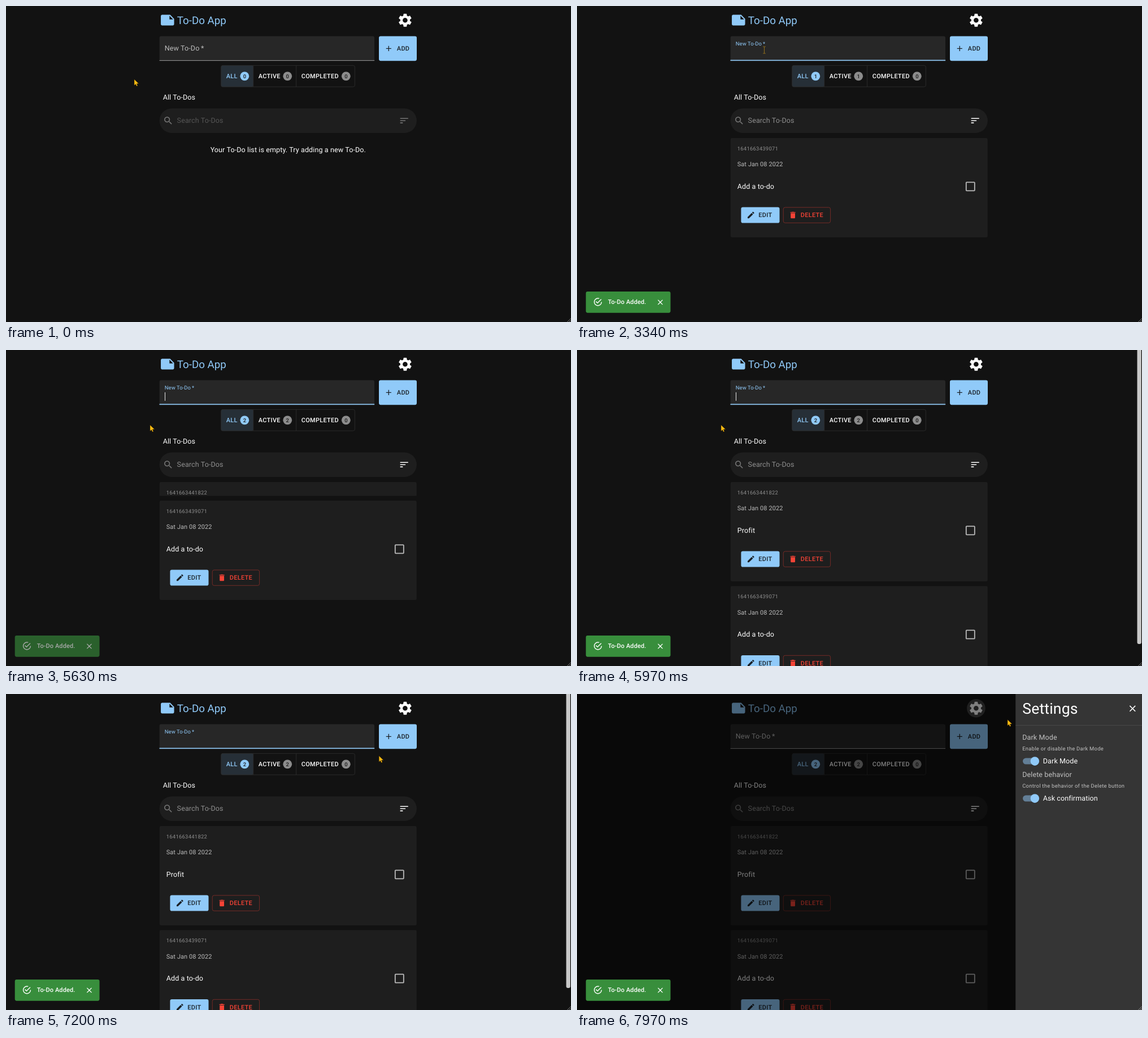
Animation of 1000x560 px, one loop 8000 ms. Source, as an HTML page:

```html
<!DOCTYPE html>
<html lang="en">
<head>
<meta charset="utf-8">
<title>To-Do App</title>
<style>
  html, body { margin: 0; width: 100%; height: 100%; overflow: hidden; background: #121212; }
  svg { display: block; width: 100vw; height: 100vh; }
  text { font-family: Roboto, sans-serif; white-space: pre; text-rendering: geometricPrecision; }
  .body1 { font-size: 12.5px; letter-spacing: .00938em; }
  .body2 { font-size: 10.94px; letter-spacing: .01071em; }
  .caption { font-size: 9.375px; letter-spacing: .03333em; }
  .button { font-size: 10.94px; font-weight: 500; letter-spacing: .02857em; }
  .badge { font-size: 9.375px; font-weight: 500; text-anchor: middle; }
  .title { font-size: 18.75px; }
  .heading { font-size: 26.56px; letter-spacing: .00735em; }
  .tip { font-size: 8.59px; font-weight: 500; text-anchor: middle; }
  .strong { font-weight: 500; }
  .middle { text-anchor: middle; }
</style>
</head>
<body>
<svg id="stage" viewBox="0 0 1000 560" xmlns="http://www.w3.org/2000/svg"></svg>
<script>
const LOOP = 8000;
const BLUE = '#90caf9', RED = '#f44336', INK = '#1b2127', PAPER = '#1e1e1e';
const LEFT = 271.6, WIDTH = 455.3;
const CARD_TOP = 233.9, CARD_H = 176, CARD_GAP = 8.4;

const ICON = {
  note: 'M22 10l-6-6H4c-1.1 0-2 .9-2 2v12c0 1.1.9 2 2 2h16c1.1 0 2-.9 2-2v-8zm-7-4.5l5.5 5.5H15V5.5z',
  plus: 'M19 13h-6v6h-2v-6H5v-2h6V5h2v6h6v2z',
  search: 'M15.5 14h-.79l-.28-.27C15.41 12.59 16 11.11 16 9.5 16 5.91 13.09 3 9.5 3S3 5.91 3 9.5 5.91 16 9.5 16c1.61 0 3.09-.59 4.23-1.57l.27.28v.79l5 4.99L20.49 19l-4.99-5zm-6 0C7.01 14 5 11.99 5 9.5S7.01 5 9.5 5 14 7.01 14 9.5 11.99 14 9.5 14z',
  sort: 'M3 18h6v-2H3v2zM3 6v2h18V6H3zm0 7h12v-2H3v2z',
  pencil: 'M3 17.25V21h3.75L17.81 9.94l-3.75-3.75L3 17.25zM20.71 7.04c.39-.39.39-1.02 0-1.41l-2.34-2.34c-.39-.39-1.02-.39-1.41 0l-1.83 1.83 3.75 3.75 1.83-1.83z',
  bin: 'M6 19c0 1.1.9 2 2 2h8c1.1 0 2-.9 2-2V7H6v12zM19 4h-3.5l-1-1h-5l-1 1H5v2h14V4z',
  close: 'M19 6.41L17.59 5 12 10.59 6.41 5 5 6.41 10.59 12 5 17.59 6.41 19 12 13.41 17.59 19 19 17.59 13.41 12z',
  done: 'M20 12A8 8 0 1 1 12 4C12.76 4 13.5 4.11 14.2 4.31L15.77 2.74C14.61 2.26 13.34 2 12 2A10 10 0 1 0 22 12M7.91 10.08L6.5 11.5 11 16 21 6 19.59 4.58 11 13.17z'
};

// Markup helpers
const rect = (x, y, w, h, fill, r = 0, more = '') =>
  `<rect x="${x}" y="${y}" width="${w}" height="${h}" rx="${r}" fill="${fill}" ${more}/>`;
const circle = (x, y, r, fill, more = '') =>
  `<circle cx="${x}" cy="${y}" r="${r}" fill="${fill}" ${more}/>`;
const text = (s, x, y, cls, fill = '#fff', more = '') =>
  `<text x="${x}" y="${y}" class="${cls}" fill="${fill}" ${more}>${s}</text>`;
const icon = (name, cx, cy, size, fill, more = '') =>
  `<path d="${ICON[name]}" fill="${fill}" transform="translate(${cx} ${cy}) scale(${size / 24}) translate(-12 -12)" ${more}/>`;
const frame = (x, y, w, h, stroke, r = 3.1) =>
  rect(x, y, w, h, 'none', r, `stroke="${stroke}" stroke-width=".8"`);

function gear(cx, cy, scale) {
  const tooth = 'M-2.75-6L-2.35-9.2Q-2.3-9.6-1.9-9.6H1.9Q2.3-9.6 2.35-9.2L2.75-6Z';
  const teeth = [0, 60, 120, 180, 240, 300].map(a => `<path d="${tooth}" transform="rotate(${a})"/>`).join('');
  return `<g transform="translate(${cx} ${cy}) scale(${scale})" fill="#fff">${teeth}
    <circle r="5.4" fill="none" stroke="#fff" stroke-width="3.6"/></g>`;
}

function toggle(label, x, cx, fill, badgeFill, id) {
  return text(label, x, 128.2, 'button', fill) + circle(cx, 124.3, 7.9, badgeFill)
    + text('0', cx, 127.7, 'badge', '#1a1a1a', `id="${id}"`);
}

function card(id, stamp, title) {
  return `<clipPath id="${id}Clip"><rect id="${id}Mask" x="${LEFT}" width="${WIDTH}" height="0"/></clipPath>
  <g id="${id}"><g clip-path="url(#${id}Clip)">
    ${rect(LEFT, 0, WIDTH, CARD_H, PAPER, 3.1)}
    ${text(stamp, 283.7, 22.2, 'caption', '#8f8f8f')}
    ${text('Sat Jan 08 2022', 283.7, 50.4, 'body2', '#bcbcbc')}
    ${text(title, 283.8, 89.8, 'body1')}
    ${rect(688.8, 78.4, 15, 15, 'none', 1, 'stroke="#bcbcbc" stroke-width="1.8"')}
    ${rect(290.4, 122.7, 68.1, 28, BLUE, 3.1)}
    ${icon('pencil', 307.8, 136.6, 15.6, INK)}
    ${text('EDIT', 321.2, 140.4, 'button', INK)}
    ${frame(365.2, 123, 83.4, 27.4, '#892f29')}
    ${icon('bin', 382.1, 136.6, 15.6, RED)}
    ${text('DELETE', 395.8, 140.4, 'button', RED)}
  </g></g>`;
}

function setting(y, head, note, label) {
  return text(head, 788.2, y, 'body1', '#c2c2c2') + text(note, 788.2, y + 18.2, 'caption', '#c2c2c2')
    + rect(789, y + 32.2, 26.6, 10.9, '#637f97', 5.45)
    + circle(810.3, y + 38.4, 7.9, '#000', 'opacity=".2"') + circle(810.3, y + 37.7, 7.8, BLUE)
    + text(label, 824.8, y + 41.9, 'body1');
}

const stage = document.getElementById('stage');
stage.innerHTML = `
  ${rect(0, 0, 1000, 560, '#121212')}
  ${icon('note', 285.8, 25, 28.2, BLUE)}
  ${text('To-Do App', 302.8, 31.6, 'title', BLUE)}
  ${circle(706.4, 25, 20.5, '#fff', 'id="hover"')}
  ${circle(706.4, 25.2, 16.3, '#fff', 'id="focus"')}
  ${gear(706.4, 25.2, 1.2)}

  <path d="M${LEFT} 97V56.6Q${LEFT} 53.5 274.7 53.5H649Q652.1 53.5 652.1 56.6V97Z" fill="#272727"/>
  ${rect(LEFT, 96.3, 380.5, .8, '#b8b8b8')}
  ${rect(LEFT, 95.5, 380.5, 1.6, BLUE, 0, 'id="line"')}
  ${text('New To-Do\u2009*', 0, 0, 'body1', '#bcbcbc', 'id="label"')}
  ${text('', 280.9, 86.4, 'body1', '#fff', 'id="value"')}
  ${rect(0, 75, .9, 15, '#fff', 0, 'id="caret"')}
  ${rect(660, 53.5, 67, 43.7, BLUE, 3.1)}
  ${rect(660, 53.5, 67, 43.7, '#42a5f5', 3.1, 'id="addHover"')}
  ${icon('plus', 677.3, 75.4, 15.6, INK)}
  ${text('ADD', 691.8, 79.3, 'button', INK)}

  ${rect(380.6, 105.3, 57, 38, '#262f37', 3.1)}
  ${frame(380.8, 105.4, 236.6, 37.8, '#303030')}
  ${rect(437.3, 105.4, .8, 37.8, '#303030')}
  ${rect(513.3, 105.4, .8, 37.8, '#303030')}
  ${toggle('ALL', 389.7, 422.3, BLUE, BLUE, 'all')}
  ${toggle('ACTIVE', 446.8, 498.2, '#fff', '#8c8c8c', 'active')}
  ${toggle('COMPLETED', 522.7, 601.8, '#fff', '#8c8c8c', 'completed')}

  ${text('All To-Dos', 277.7, 166.4, 'body1')}
  ${rect(LEFT, 181.5, WIDTH, 43.5, PAPER, 21.7)}
  ${icon('search', 287.1, 203.2, 18.75, '#757575')}
  ${text('Search To-Dos', 302.6, 207.4, 'body1', '#565656', 'id="searchText"')}
  ${icon('sort', 704.7, 203.2, 18.75, '#757575', 'id="sort"')}
  ${text('Your To-Do list is empty. Try adding a new To-Do.', 499.3, 259.2, 'body1 middle', '#fff', 'id="empty"')}

  ${card('first', '1641663439071', 'Add a to-do')}
  ${card('second', '1641663441822', 'Profit')}

  <g id="tooltip">${rect(685.3, 56.3, 41.8, 15.4, '#616161', 3.1, 'opacity=".92"')}
    ${text('Settings', 706.4, 67.2, 'tip')}</g>
  ${rect(991.5, -4, 7.3, 0, '#c9c9c9', 3, 'id="thumb"')}
  ${rect(0, 0, 1000, 560, '#000', 0, 'id="backdrop"')}

  <g id="drawer">
    ${rect(776.2, 0, 223.8, 560, '#353535')}
    ${text('Settings', 788.2, 34.7, 'heading')}
    ${icon('close', 983.3, 25.8, 18.75, '#fff')}
    ${rect(776.2, 55, 223.8, .8, '#4d4d4d')}
    ${setting(81.4, 'Dark Mode', 'Enable or disable the Dark Mode', 'Dark Mode')}
    ${setting(147.4, 'Delete behavior', 'Control the behavior of the Delete button', 'Ask confirmation')}
  </g>

  <g id="snack">
    ${rect(15.7, 506, 149.8, 37.7, '#388e3c', 3.1)}
    ${icon('done', 37, 524.5, 17.2, '#fff')}
    ${text('To-Do Added.', 54.8, 528.3, 'body2 strong')}
    ${icon('close', 147.4, 525, 15.6, '#fff')}
  </g>
  <path d="M1000 553.5L993.5 560M1000 557L997 560" stroke="#a0a0a0" stroke-width=".8"/>
  <path id="arrow" d="M0 0V10.6L2.5 8.4 4.1 12 5.9 11.2 4.3 7.7 7.8 7.5Z" fill="#fdbc12" stroke="#3a2a00" stroke-width=".4"/>
  <path id="beam" d="M-2.3-6H-.8L0-5.4.8-6H2.3M0-5.4V5.4M-2.3 6H-.8L0 5.4.8 6H2.3" fill="none" stroke="#8c6c1c" stroke-width="1.1"/>`;

const el = {};
stage.querySelectorAll('[id]').forEach(node => el[node.id] = node);

function set(name, attrs) {
  for (const key in attrs) el[name].setAttribute(key, attrs[key]);
}

// Motion helpers
const clamp = v => Math.min(1, Math.max(0, v));
const mix = (a, b, k) => a + (b - a) * k;
const ramp = (t, start, length) => clamp((t - start) / length);

function bezier(x1, y1, x2, y2) {
  const at = (a, b, s) => 3 * (1 - s) ** 2 * s * a + 3 * (1 - s) * s * s * b + s ** 3;
  return x => {
    if (x <= 0 || x >= 1) return clamp(x);
    let lo = 0, hi = 1;
    for (let i = 0; i < 24; i++) {
      const mid = (lo + hi) / 2;
      if (at(x1, x2, mid) < x) lo = mid; else hi = mid;
    }
    return at(y1, y2, lo);
  };
}
const easeInOut = bezier(.4, 0, .2, 1);
const easeOut = bezier(0, 0, .2, 1);

function along(points, t) {
  let i = points.findIndex(p => p[0] > t);
  if (i === 0) return points[0].slice(1);
  if (i < 0) return points[points.length - 1].slice(1);
  const a = points[i - 1], b = points[i], k = (t - a[0]) / (b[0] - a[0]);
  return [mix(a[1], b[1], k), mix(a[2], b[2], k)];
}

// Timeline
const FOCUS = 610, BLUR = 7685, ADD_1 = 2755, ADD_2 = 5570, OPEN = 7765;
const BLINK = 530, GROW = 204;

const PATH = [
  [30, 227, 130], [560, 331.5, 78], [3500, 331.5, 78], [3950, 255, 133],
  [6110, 255, 133], [6310, 281, 123], [6560, 281, 123], [6780, 420, 250],
  [6990, 589.5, 185], [7200, 660, 110], [7430, 703, 24], [7765, 703, 24], [7965, 762, 45.5]
];

// time, text, caret hidden
const KEYS = [
  [FOCUS, ''], [905, 'A'], [1165, 'Ad'], [1235, 'Add'], [1365, 'Add '], [1435, 'Add a'],
  [1635, 'Add a', true], [1765, 'Add a t'], [1835, 'Add a to'],
  [2165, 'Add a to-'], [2300, 'Add a to-d'], [2435, 'Add a to-do'], [ADD_1, ''], [2800, ''],
  [4875, 'P'], [5010, 'Pr'], [5145, 'Pro'], [5295, 'Prof'], [5365, 'Profi'], [5430, 'Profit'], [5500, '']
];

function drawField(t) {
  const shrink = t < BLUR ? easeOut(ramp(t, FOCUS, 200)) : 1 - easeOut(ramp(t, BLUR, 200));
  const tint = [144, 202, 249].map(c => Math.round(mix(188, c, shrink)));
  set('label', {
    transform: `translate(280.8 ${mix(79.3, 69.5, shrink)}) scale(${mix(1, .75, shrink)})`,
    fill: `rgb(${tint})`
  });
  set('line', { x: LEFT + 190.25 * (1 - shrink), width: 380.5 * shrink });

  const key = KEYS.filter(k => k[0] <= t).pop() || [0, '', true];
  if (el.value.textContent !== key[1]) el.value.textContent = key[1];
  const lit = !key[2] && t < BLUR && (t - key[0]) % (2 * BLINK) < BLINK;
  set('caret', {
    x: 281 + (key[1] ? el.value.getComputedTextLength() : 0),
    opacity: lit ? 1 : 0
  });
}

function drawList(t) {
  const count = (t >= ADD_1) + (t >= ADD_2);
  el.all.textContent = el.active.textContent = count;
  set('empty', { opacity: count ? 0 : 1 });
  set('searchText', { fill: count ? '#8f8f8f' : '#565656' });
  set('sort', { fill: count ? '#fff' : '#757575' });

  const h1 = CARD_H * easeInOut(ramp(t, ADD_1, 300));
  const h2 = CARD_H * easeInOut(ramp(t, ADD_2, 300));
  const shift = count > 1 ? h2 + CARD_GAP : 0;
  set('firstMask', { height: h1 });
  set('secondMask', { height: h2 });
  set('first', { transform: `translate(0 ${CARD_TOP + shift})` });
  set('second', { transform: `translate(0 ${CARD_TOP})` });

  const page = CARD_TOP + h1 + shift + 7.7;
  set('thumb', { height: page > 560 && t < OPEN ? 560 * 560 / page + 4 : 0 });
}

function drawSnack(t) {
  const leaving = t >= ADD_2 && t < ADD_2 + GROW;
  const start = t < ADD_2 ? ADD_1 : ADD_2 + GROW;
  const fade = leaving ? 1 - easeInOut(ramp(t, ADD_2, GROW)) : easeInOut(ramp(t, start, GROW));
  const size = leaving
    ? 1 - easeInOut(ramp(t, ADD_2 + GROW / 3, GROW))
    : easeInOut(ramp(t, start, GROW * 2 / 3));
  set('snack', {
    opacity: fade,
    transform: `translate(90.6 524.8) scale(${mix(.75, 1, size)} ${mix(.5625, 1, size)}) translate(-90.6 -524.8)`
  });
}

function drawSettings(t) {
  set('hover', { opacity: .09 * (ramp(t, 7390, 150) - ramp(t, 7800, 120)) });
  set('focus', { opacity: .2 * ramp(t, 7800, 120) });
  set('addHover', { opacity: easeInOut(ramp(t, 7235, 200)) * (1 - easeInOut(ramp(t, 7355, 250))) });
  set('tooltip', { opacity: easeInOut(ramp(t, 7500, 180)) * (1 - easeInOut(ramp(t, 7690, 200))) });
  set('backdrop', { opacity: .5 * easeInOut(ramp(t, OPEN, 200)) });
  set('drawer', { transform: `translate(${224 * (1 - easeOut(ramp(t, OPEN, 200)))} 0)` });
}

function drawPointer(t) {
  const [x, y] = along(PATH, t);
  const inField = x > 272 && x < 652 && y > 53 && y < 97;
  const transform = `translate(${x} ${y})`;
  set('arrow', { transform, opacity: inField ? 0 : 1 });
  set('beam', { transform, opacity: inField ? 1 : 0 });
}

function render(t) {
  drawField(t);
  drawList(t);
  drawSnack(t);
  drawSettings(t);
  drawPointer(t);
}

function tick() {
  render(performance.now() % LOOP);
  requestAnimationFrame(tick);
}
tick();
</script>
</body>
</html>
```
